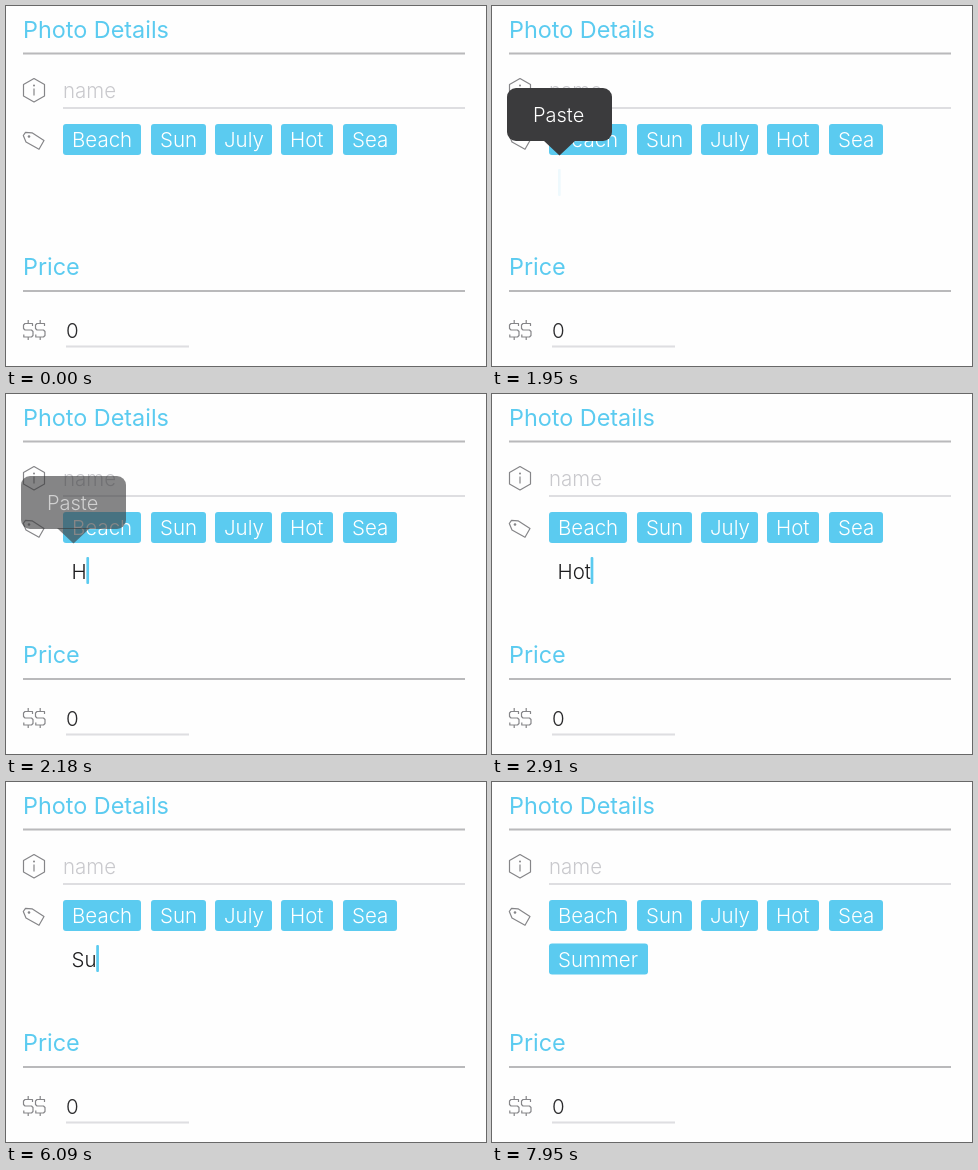
Animation, 480 px wide and 360 px high, one loop 8 s. Source, as an HTML page with a canvas:

```html
<!DOCTYPE html>
<html lang="en">
<head>
<meta charset="utf-8">
<title>Photo details form</title>
<style>
  html, body { margin: 0; width: 100%; height: 100%; overflow: hidden; background: #fefefe; }
  canvas { display: block; }
</style>
</head>
<body>
<canvas id="stage" width="480" height="360"></canvas>
<script>
const ctx = document.getElementById('stage').getContext('2d');
const LOOP = 8000;
const BLUE = '#5bcbf0';
const DARK = '#2b2b2d';
const ICON = '#858588';

const TAGS = [['Beach', 57, 78], ['Sun', 145, 55], ['July', 209, 57], ['Hot', 275, 52], ['Sea', 337, 54]];
const TYPING = [
  [0, ''], [2030, 'H'], [2300, 'Ho'], [2730, 'Hot'], [3000, ''],
  [5910, 'S'], [6050, 'Su'], [6230, 'Sum'], [6420, 'Summ'], [6590, 'Summe'], [6730, 'Summer'], [7180, '']
];
// Spans in which the caret is lit, each ending with a fade
const CARET_ON = [[90, 910], [1270, 1960], [2030, 3680], [3950, 4680], [5050, 5730], [5910, 7940]];
const TAG_ADDED = 7180;

const ramp = (t, from, to) => Math.min(1, Math.max(0, (t - from) / (to - from)));

function text(str, x, y, color, size = 20.5, weight = 300) {
  ctx.font = `${weight} ${size}px Inter, sans-serif`;
  ctx.fillStyle = color;
  ctx.fillText(str, x, y);
}

function rule(x1, x2, y, color) {
  ctx.fillStyle = color;
  ctx.fillRect(x1, y, x2 - x1, 2);
}

function box(x, y, w, h, r, color) {
  ctx.fillStyle = color;
  ctx.beginPath();
  ctx.roundRect(x, y, w, h, r);
  ctx.fill();
}

function tag(label, x, y, w) {
  box(x, y, w, 31, 3, BLUE);
  text(label, x + 9, y + 23, '#fff');
}

function heading(label, y) {
  text(label, 17, y, BLUE, 23.4, 400);
  rule(17, 459, y + 15, '#b9b9bb');
}

function icons() {
  ctx.strokeStyle = ICON;
  ctx.lineWidth = 1.2;
  ctx.lineJoin = 'round';
  ctx.stroke(new Path2D('M28 72.5L38.5 78.5V90L28 96L17.5 90V78.5ZM28 82.5V89.5'));
  ctx.stroke(new Path2D('M19.5 126.3L26 126.8L38 134.5L33 143.3L20 136L17.3 129.5Z'));
  ctx.fillStyle = ICON;
  for (const [x, y, r] of [[28, 79.5, 1], [23, 130.5, 1.3]]) {
    ctx.beginPath();
    ctx.arc(x, y, r, 0, 7);
    ctx.fill();
  }
  for (const x of [17, 29]) {
    ctx.save();
    ctx.translate(x, 314);
    ctx.stroke(new Path2D('M9.5 6V3.5H2L.5 5V8.5L2 10H8.5L10 11.5V15.5L8.5 17H.8V14.5M5.2 0V3.5M5.2 17V20'));
    ctx.restore();
  }
}

function caret(t, x) {
  const span = CARET_ON.find(([from, to]) => t >= from && t < to);
  if (!span) return;
  ctx.globalAlpha = ramp(t, span[0], span[0] + 60) * (1 - ramp(t, span[1] - 270, span[1]) ** 3);
  box(x, 163, 2.7, 27, 1, BLUE);
  ctx.globalAlpha = 1;
}

function pasteMenu(t) {
  ctx.globalAlpha = ramp(t, 1810, 1930) * (1 - ramp(t, 2100, 2310));
  box(15, 82, 105, 53, 9, '#3b3b3d');
  ctx.fill(new Path2D('M51 134H84L67.5 149.5Z'));
  text('Paste', 41, 115.5, '#fff', 20);
  ctx.globalAlpha = 1;
}

function draw(t) {
  ctx.fillStyle = '#fefefe';
  ctx.fillRect(0, 0, 480, 360);

  heading('Photo Details', 31.5);
  heading('Price', 269);
  icons();
  text('name', 57, 92, '#c9c9cd');
  rule(57, 459, 101, '#dedee1');
  text('0', 60, 332, DARK);
  rule(60, 183, 339.5, '#dedee1');
  for (const [label, x, w] of TAGS) tag(label, x, 118, w);

  const typed = TYPING.findLast(([start]) => t >= start)[1];
  text(typed, 65.5, 185, '#1c1c1e');
  const end = 66 + ctx.measureText(typed).width - (typed ? 0.8 : 0);

  ctx.globalAlpha = ramp(t, TAG_ADDED, TAG_ADDED + 120);
  tag('Summer', 57, 161.5, 99);
  ctx.globalAlpha = 1;

  caret(t, t < TAG_ADDED ? end : 165);
  pasteMenu(t);
}

const began = performance.now();
function tick() {
  draw((performance.now() - began) % LOOP);
  requestAnimationFrame(tick);
}
tick();
</script>
</body>
</html>
```
